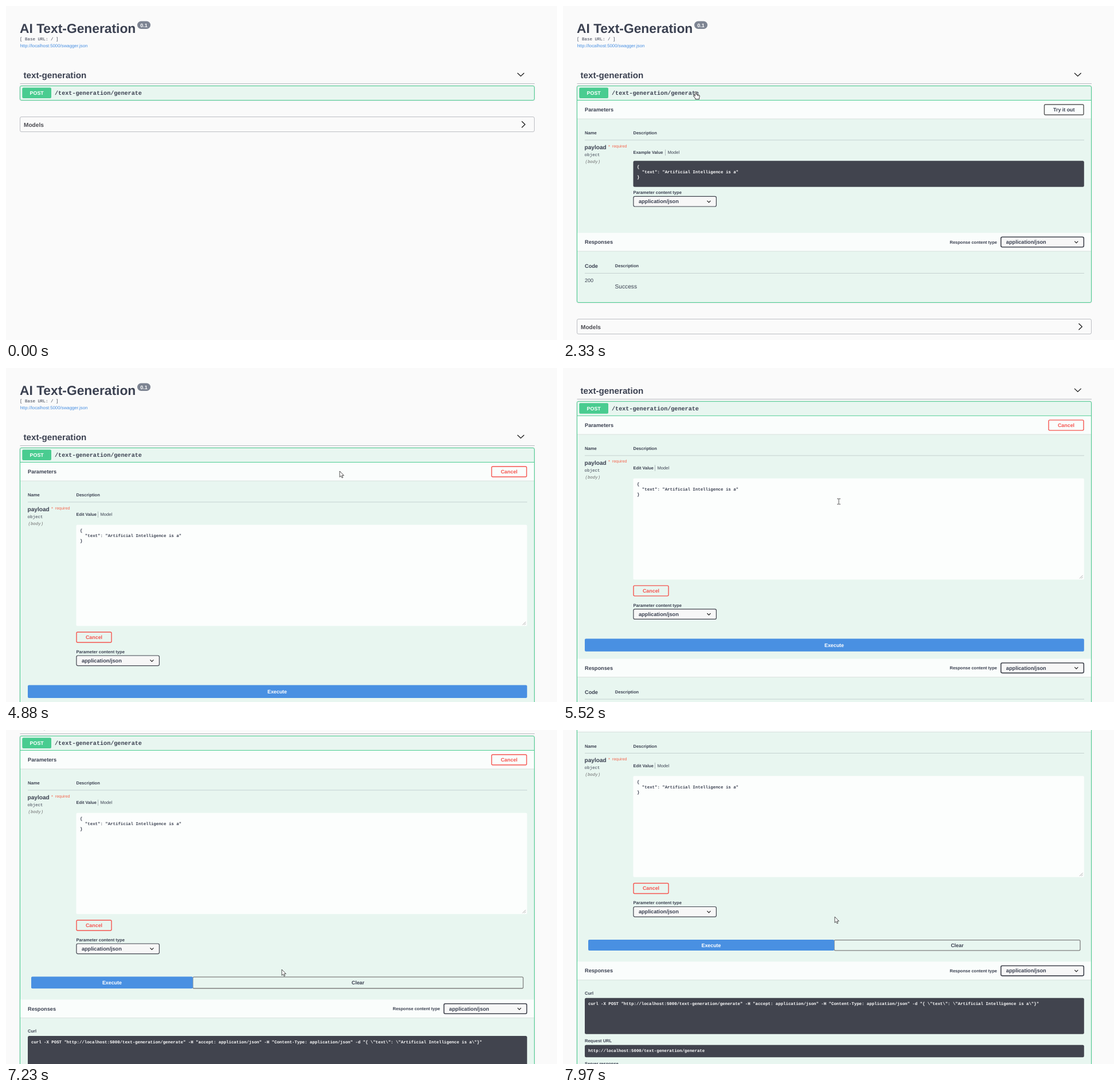
Animation, 961 px wide and 583 px high, one loop 8 s. Source, as an HTML page:

```html
<!DOCTYPE html>
<html lang="en">
<head>
<meta charset="utf-8">
<title>AI Text-Generation</title>
<style>
  html, body { margin: 0; width: 100%; height: 100%; overflow: hidden; background: #fafafa; }
  svg { display: block; }
  text { font-family: "Liberation Sans", Arial, sans-serif; fill: #3b4151; white-space: pre; text-rendering: geometricPrecision; }
  .b { font-weight: 700; }
  .m { font-family: "Liberation Mono", "Courier New", monospace; }
  .mid { text-anchor: middle; }
</style>
</head>
<body>
<svg id="stage" width="961" height="583" viewBox="0 0 961 583"></svg>
<script>
const LOOP = 8000;
const EXPAND = 1820, EDIT = 4450, LOAD = 6350, DONE = 7150;
const INK = '#3b4151', DARK = '#41444e', RED = '#f5544f', GREEN = '#49cc90', BLUE = '#4990e2';
const CLICKS = [[1690, 1920], [4370, 4520], [6270, 6420]];
// time, x, y of the pointer's hot spot
const POINTER = [
  [30, 908, 575], [340, 36, 310], [800, 241, 152], [850, 241, 152], [1130, 231.5, 149.5],
  [2330, 231.5, 149.5], [3120, 866, 184], [3170, 866, 184], [3300, 857.5, 180],
  [4600, 857.5, 180], [4880, 582, 180], [5160, 481, 233], [5750, 481, 233],
  [6000, 498, 445], [6030, 498, 445], [6130, 492, 441], [7100, 492, 441],
  [7230, 481, 418], [7550, 474, 326]
];
const PAYLOAD = ['{', '  "text": "Artificial Intelligence is a"', '}'];
const URL_TEXT = 'http://localhost:5000/text-generation/generate';
const CURL = `curl -X POST "${URL_TEXT}" -H "accept: application/json" -H "Content-Type: application/json"`
  + ' -d "{ \\"text\\": \\"Artificial Intelligence is a\\"}"';

const clamp = u => Math.max(0, Math.min(1, u));
const smooth = (t, a, b) => { const u = clamp((t - a) / (b - a)); return u * u * (3 - 2 * u); };

const text = (x, y, size, str, cls = '', fill = INK) =>
  `<text x="${x}" y="${y}" font-size="${size}" class="${cls}" style="fill:${fill}">${str}</text>`;
const box = (x1, y1, x2, y2, fill, stroke = 'none', sw = 1, r = 2.5) =>
  `<rect x="${x1}" y="${y1}" width="${x2 - x1}" height="${y2 - y1}" rx="${r}" fill="${fill}" stroke="${stroke}" stroke-width="${sw}"/>`;
const line = (d, stroke, sw = 1) => `<path d="${d}" fill="none" stroke="${stroke}" stroke-width="${sw}"/>`;
const rule = y => line(`M38 ${y}H909`, 'rgba(59,65,81,.2)');
const shift = (dy, s) => `<g transform="translate(0 ${dy})">${s}</g>`;
const button = (x1, y1, x2, y2, label, color, border = color) =>
  box(x1, y1, x2, y2, 'none', border, 1.4, 2) + text((x1 + x2) / 2, (y1 + y2) / 2 + 3, 8.9, label, 'b mid', color);
const select = (x, y, sw) =>
  box(x, y, x + 144.5, y + 17.6, '#f7f7f7', DARK, sw) + text(x + 9, y + 11.8, 9.2, 'application/json', 'b')
  + line(`M${x + 128.5} ${y + 7.4}l3 3l3-3`, '#222', 1.2);
const band = (y, title) =>
  box(25, y, 921, y + 32, 'rgba(255,255,255,.8)', 'none', 0, 0) + line(`M25 ${y + 32}H921`, 'rgba(0,0,0,.1)')
  + text(38, y + 19.2, 9.2, title, 'b');
const payload = (y, fill) =>
  PAYLOAD.map((s, i) => text(129, y + i * 9, 7.38, s, 'm b', fill)).join('');

function pageHead() {
  return text(24, 47, 22.8, 'AI Text-Generation', 'b')
    + box(229, 26.5, 252, 40, '#7d8492', 'none', 0, 6.7) + text(240.5, 36.8, 9, '0.1', 'b mid', '#fff')
    + text(24, 60, 7.5, '[ Base URL: / ]', 'm')
    + text(24.5, 71.5, 7.84, 'http://localhost:5000/swagger.json', '', BLUE)
    + text(30.5, 125.7, 15.2, 'text-generation', 'b')
    + line('M892 117l5.8 5.5l5.8-5.5', '#111', 1.2) + line('M24.5 135.5H922', 'rgba(59,65,81,.35)');
}

function operation(bottom) {
  return box(24.5, 139.5, 921.5, bottom, 'none', 'rgba(0,0,0,.05)', 3.5)
    + box(24.5, 139.5, 921.5, bottom, '#e8f6f0', GREEN)
    + box(28.3, 142.5, 79, 161, GREEN, 'none', 0, 2) + text(53.7, 155.4, 8.9, 'POST', 'b mid', '#fff')
    + text(85, 155, 10.13, '/text-generation/generate', 'm b');
}

function models(y) {
  return shift(y, box(24.5, 0, 921.5, 26, 'none', 'rgba(59,65,81,.32)') + text(31, 17, 10.13, 'Models', 'b', '#4a4a50')
    + line('M899.5 7.8l5.8 5.5l-5.8 5.5', '#111', 1.2));
}

function parameters(t) {
  const edit = t >= EDIT;
  const sepX = edit ? 160.5 : 178.5;
  let s = line('M25 164.5H921', GREEN) + band(165, 'Parameters')
    + text(38, 224.4, 7.6, 'Name', 'b') + text(122.5, 224.4, 7.5, 'Description', 'b') + rule(234)
    + text(37.5, 250, 10.13, 'payload', 'b')
    + text(79, 247.5, 7.6, '*', '', '#f4624a') + text(85.8, 246.6, 7, 'required', '', '#f4624a')
    + text(37.5, 262, 7.5, 'object', 'm')
    + `<g font-style="italic">${text(38.5, 273.7, 7.4, '(body)', 'm', '#6b6b6b')}</g>`
    + text(122.5, 258.3, 7.4, edit ? 'Edit Value' : 'Example Value', 'b')
    + line(`M${sepX} 250.5V261`, 'rgba(59,65,81,.4)', .8) + text(sepX + 4, 258.3, 7.6, 'Model');
  if (edit) {
    s += button(847, 172, 908, 190, 'Cancel', RED)
      + box(122.5, 273.8, 908.8, 450.3, '#fcfefd', 'none', 0, 2) + payload(286.2, INK)
      + line('M901 448.5l5.5-5.5M904 448.5l2.5-2.5', '#999', .8)
      + button(123, 461, 184, 479, 'Cancel', RED);
  } else {
    if (t > 3100) s += box(838.5, 171, 909, 191, 'none', 'rgba(0,0,0,.12)', 3, 3);
    s += button(839.5, 172, 908, 190, 'Try it out', INK, '#555')
      + box(122.5, 270.3, 908.8, 315.8, DARK) + payload(283.4, '#fff');
  }
  return s + shift(edit ? 169.6 : 0, text(122.5, 328.2, 7.6, 'Parameter content type', 'b') + select(122.9, 332.4, 1.2));
}

function execute(grow) {
  const label = (x, y, s, fill) => text(x, y, 8.9, s, 'b mid', fill);
  if (grow === null) return box(38, 553.6, 908.8, 576, BLUE, 'none', 0, 2) + label(473, 567.8, 'Execute', '#fff');
  const end = 108 + 730 * grow / (1 + grow);
  const bottom = 578.6 + 3 * (1 - grow);
  const mid = (bottom + 559.8) / 2 + 3;
  return box(end, 560.2, 902, bottom - .3, 'none', '#808080', 1.3, 2) + box(44, 559.6, end, bottom, BLUE, 'none', 0, 2)
    + label((44 + end) / 2, mid, 'Execute', '#fff') + label((end + 902) / 2, mid, 'Clear', INK);
}

function spinner(t) {
  const fade = clamp((t - LOAD) / 500);
  return `<g opacity="${fade}">` + `<circle cx="473" cy="613.5" r="18.5" fill="none" stroke="rgba(85,85,85,.12)" stroke-width="1.3"/>`
    + `<g transform="rotate(${(t - LOAD) * .36} 473 613.5)">${line('M459.9 600.4a18.5 18.5 0 0 1 26.2 0', 'rgba(0,0,0,.6)', 1.3)}</g>`
    + text(473, 615.8, 6.3, 'LOADING', 'b mid') + '</g>';
}

function responses(done) {
  const s = band(396, 'Responses') + text(674.5, 414.6, 7.5, 'Response content type', 'b') + select(763.8, 403.2, 1.6);
  if (!done) return s + text(38, 457, 9.2, 'Code', 'b') + text(90.8, 456.4, 7.5, 'Description', 'b') + rule(466.5)
    + text(38, 482, 9, '200') + text(90.5, 493, 10.2, 'Success');
  return s + text(38, 453.8, 7.5, 'Curl', 'b') + box(38, 459.4, 908.8, 522.4, DARK) + text(44, 472, 7.37, CURL, 'm b', '#fff')
    + text(38, 536.4, 7.5, 'Request URL', 'b') + box(38, 541.4, 908.8, 563, DARK) + text(44, 554.2, 7.37, URL_TEXT, 'm b', '#fff')
    + text(38, 576.6, 7.5, 'Server response', 'b');
}

function page(t) {
  if (t < EXPAND) return pageHead() + operation(164.5) + models(193.5);
  const edit = t >= EDIT, done = t >= DONE;
  const grow = done ? 1 - (1 - clamp((t - DONE) / 300)) ** 1.76 : null;
  const dy = done ? 201.8 + 3 * (1 - grow) : t >= LOAD ? 256 : edit ? 192.7 : 0;
  const bottom = done ? 1200 : 517.5 + dy;
  return pageHead() + operation(bottom) + parameters(t) + (edit ? execute(grow) : '')
    + (t >= LOAD && !done ? spinner(t) : '') + shift(dy, responses(done)) + models(bottom + 29);
}

const SHAPES = {
  arrow: '<path d="M0 0V10.4L2.4 8.2L4 11.8L5.6 11.1L4.1 7.6H7.3Z" fill="#fff" stroke="#222" stroke-width=".8"/>',
  hand: '<path d="M-1.2 1C-1.2-.3 1.1-.3 1.1 1V4.8L5.4 5.8Q7 6.2 6.8 8L6 11V13.2H-.6V11.6L-4 7.8Q-4.2 6 -2.6 6.6L-1.2 7.8Z" fill="#fff" stroke="#222" stroke-width=".9"/>'
    + line('M2.8 5.6V7.6M4.6 6V8', '#222', .7),
  beam: line('M-3-4.8H-.6L0-4.3L.6-4.8H3M0-4.3V4.3M-3 4.8H-.6L0 4.3L.6 4.8H3', '#444', .9)
};

function pointerAt(t) {
  const i = POINTER.findIndex(p => p[0] > t);
  if (i < 0) return POINTER[POINTER.length - 1].slice(1);
  const a = POINTER[i - 1], b = POINTER[i], u = smooth(t, a[0], b[0]);
  return [a[1] + (b[1] - a[1]) * u, a[2] + (b[2] - a[2]) * u];
}

function pointer(t, scroll) {
  if (t < POINTER[0][0]) return '';
  const [x, y] = pointerAt(t), py = y + scroll;
  const over = (x1, y1, x2, y2) => x > x1 && x < x2 && py > y1 && py < y2;
  const edit = t >= EDIT;
  const hand = over(24, 139, 922, 165) || (t >= EXPAND && over(edit ? 847 : 839, 172, 908, 190))
    || (edit && over(38, 553, 909, 576)) || (t < EXPAND && over(24, 193, 922, 220));
  const kind = hand ? 'hand' : edit && over(122, 274, 909, 450) ? 'beam' : 'arrow';
  const click = CLICKS.some(([a, b]) => t >= a && t < b);
  return (click ? `<circle cx="${x}" cy="${y}" r="8" fill="rgba(250,245,0,.66)"/>` : '')
    + `<g transform="translate(${x} ${y})">${SHAPES[kind]}</g>`;
}

const stage = document.getElementById('stage');
const start = performance.now();
function draw() {
  const t = (performance.now() - start) % LOOP;
  const scroll = 129 * smooth(t, 5210, 5740) + 64.6 * smooth(t, 7550, 7980);
  stage.innerHTML = shift(-scroll, page(t)) + pointer(t, scroll);
  requestAnimationFrame(draw);
}
draw();
</script>
</body>
</html>
```
